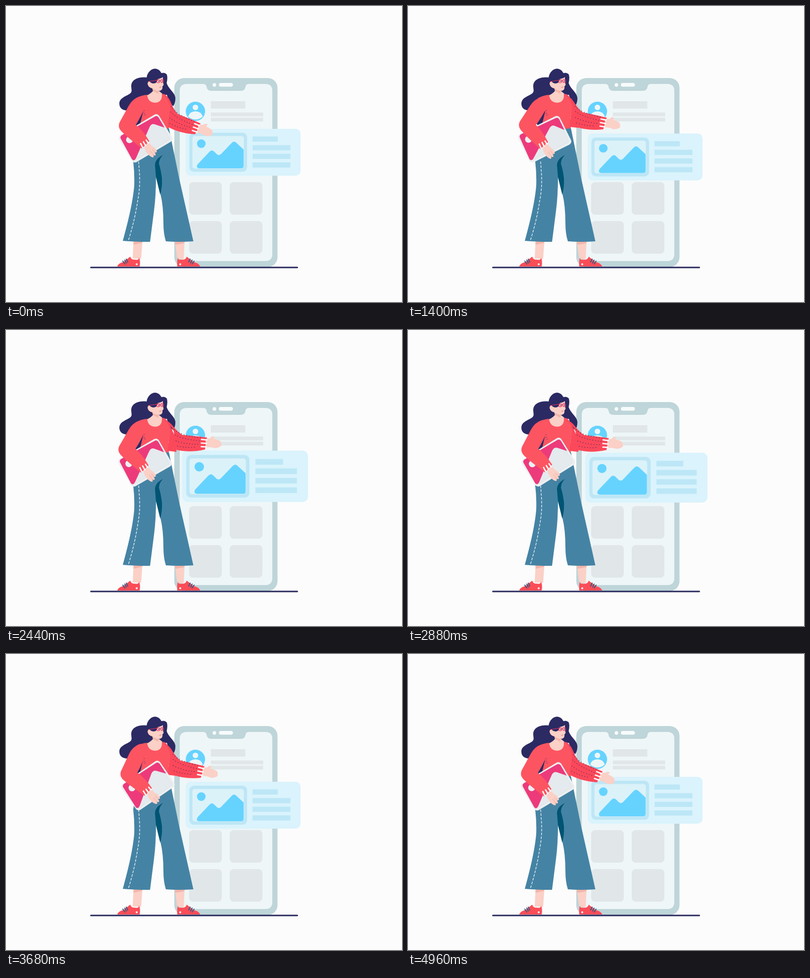
Recreate the animation shown at these times as an HTML page. Size 800x600 px, loop 5000 ms.

```html
<!DOCTYPE html>
<html lang="en">
<head>
<meta charset="utf-8">
<title>Presenting an app</title>
<style>
  html, body { margin: 0; width: 100%; height: 100%; overflow: hidden; background: #fcfcfc; }
  svg { display: block; width: 100%; height: 100%; }
  .navy { fill: #2b2a63; }
  .skin { fill: #fbd0c6; }
  .blush { fill: #f2b5aa; }
  .coral { fill: #fd5461; }
  .sleeve { fill: #fb485a; }
  .jeans { fill: #4583a4; }
  .sky { fill: #66d3ff; }
  .grey { fill: #e1e7e9; }
  .line { fill: none; stroke-linecap: round; stroke-linejoin: round; }
  .dots { stroke: #2b2a63; stroke-width: 1.5; stroke-dasharray: 0 5.6; }
  .cuff { stroke: #fff; stroke-width: 2.6; stroke-linecap: butt; }
</style>
</head>
<body>
<svg viewBox="0 0 800 600">
  <g id="phone">
    <rect x="340" y="146" width="208.5" height="383" rx="20" fill="#bed5d9"/>
    <path fill="#eef6f8" d="M365 158H398Q404 158 405 163Q406 172 415 172H474Q483 172 484 163Q485 158 491 158H524Q538 158 538 172V503Q538 517 524 517H365Q351 517 351 503V172Q351 158 365 158Z"/>
    <g fill="#f7fbfb">
      <circle cx="421" cy="160" r="3.7"/>
      <rect x="430" y="156" width="28.5" height="7.6" rx="3.8"/>
    </g>
    <circle class="sky" cx="382.7" cy="213.5" r="19.5"/>
    <g fill="#eef6f8">
      <circle cx="382.7" cy="205.5" r="5.6"/>
      <path d="M368 224Q371 213.5 382.7 213.5T397.5 224Q391 230 382.7 230T368 224Z"/>
    </g>
    <g class="grey">
      <path d="M414 193H483.5V208H414ZM414 216H519.5V223.5H414ZM414 226.5H519.5V234H414Z"/>
      <rect x="370" y="357" width="66" height="66" rx="8"/>
      <rect x="452" y="357" width="66" height="66" rx="8"/>
      <rect x="370" y="436" width="66" height="66" rx="8"/>
      <rect x="452" y="436" width="66" height="66" rx="8"/>
    </g>
  </g>

  <g id="card">
    <rect x="363" y="249" width="232" height="95" rx="10" fill="#daf3fc"/>
    <rect x="370.5" y="257" width="116.5" height="79" rx="9" fill="#bde6f5"/>
    <rect x="376.5" y="263.5" width="104" height="66" rx="5" fill="#dbf2f9"/>
    <circle class="sky" cx="394.5" cy="279" r="8.7"/>
    <path class="sky" d="M387 321L411 295.5Q416 290 421 295.5L426 300.5Q430 304 434 300.5L456 277.5Q460.5 273 465 277L480 291V324Q480 329 475 329H390Q383 328 387 321Z"/>
    <path fill="#bde7f6" d="M498 264.5H549V275H498ZM498 282H574.5V292.5H498ZM498 299.5H574.5V310H498ZM498 317H574.5V327.5H498Z"/>
  </g>

  <g id="woman">
    <path class="navy" d="M302 127C293 127 286 134 284 145C268 143 253 149 253 162C253 170 256 173 250 178C240 184 229 187 229 198C229 207 236 212 246 212L262 242L280 240L290 185L325 180Q329 198 338 203Q343 194 342 185C340 174 328 168 324.500 156Q327 147 325 139Q321 134 314 136Q310 128 302 127Z"/>
    <path class="skin" d="M295 163L297 172Q292 178 285 181V200H316V178L310 173Z"/>
    <path class="blush" d="M295 166L297 172L308 178V172Z"/>
    <path class="skin" d="M292 152Q300 149 306 148Q313 147 317 144Q316.500 153 318.500 160L316 163Q317 171 310 172Q301 172 296 167Q288 166 286 158Q286 152 292 152Z"/>
    <path class="navy" d="M289 152Q297 147 307 148Q305 157 298 157Q293 157 289 152Z"/>
    <g class="line" stroke="#e8315f" stroke-width="1.2">
      <path d="M288 153L304 150.5M311 151.500H313"/>
      <circle cx="307.500" cy="152.500" r="3.200"/>
      <ellipse cx="315.500" cy="152" rx="2.700" ry="3.300"/>
    </g>
    <path class="line" d="M310 165L313.5 164" stroke="#d86a70"/>
    <g class="navy">
      <circle cx="308.5" cy="152.5" r="1"/>
      <circle cx="316" cy="152" r="1"/>
    </g>

    <path class="skin" d="M258 470H276L273 512H256ZM340 470H361L359 513H346Z"/>
    <path class="blush" d="M258 477H276L275 480L257.5 484ZM341 477H361L360 481L342 484Z"/>
    <path fill="#fb4d57" d="M225 527Q228 521 237 519L251 508Q253 515 260 514Q268 516 269 510Q272 518 270 528H225ZM392 527Q389 521 379 519L365 508Q363 515 356 514Q348 516 347 510Q345 518 346 528H392Z"/>
    <path class="line" d="M236 517L240 523M240 515L243 521M243 513L246 519M380 517L376 523M376 515L373 521M372 513L369 519" stroke="#365a83" stroke-width="2"/>
    <g fill="#fff">
      <circle cx="264" cy="523.5" r="2"/>
      <circle cx="352" cy="523.5" r="2"/>
    </g>

    <path class="jeans" d="M268 247H329L350 350L378.5 477Q350 479 323 477Q318 462 318 440Q318 405 312 381L303 345Q303 385 299 415L291 478Q262 478 236 476C245 443 256 400 259 365Q260 340 257 315Z"/>
    <path fill="#005474" d="M317 302Q301 310 301 323L303 347L311.5 382Q316 368 315 349Q313 332 309 320Q309 310 317 302Z"/>
    <path class="line" d="M268 316C269 335 273 360 266 395Q260 435 247 476" stroke="#e6f1f5" stroke-width="1.4" stroke-dasharray="4 3.8"/>

    <path class="coral" d="M285 180Q287 196 302 196Q316 195 315 178L321 179Q335 192 333 206Q326 226 329 248L268 252L277 214L262 187Q273 181 285 180Z"/>
    <path class="line dots" d="M279 212V218M281 221H285"/>

    <path class="sleeve" d="M320 180L332 194L339 211L347 220L344 247L327 245Q328 222 332 207Q330 190 320 180Z"/>
    <g id="rightArm">
      <path class="sleeve" d="M318 179Q326 181 332 193Q339 211 347 219L377 231L393 238L382 260Q350 258 327 245Q328 222 332 207Q330 190 318 179Z"/>
      <path class="line dots" d="M334 204Q342 219 384 236M333 215Q344 227 380 242M331 227Q348 240 376 247M331 238Q350 248 366 250"/>
      <path class="skin" d="M389 240L398 241Q404 237 407 240Q408 242 404 244Q413 248 417 253Q418 257 416 262Q409 265 402 263Q393 257 385 257Z"/>
      <path class="line cuff" d="M380 238L392 243M377.5 245L389.5 249.5M375.5 252L387 256"/>
    </g>

    <g id="leftArm">
      <g transform="rotate(-30.5 281.5 268.5)">
        <rect x="234.500" y="236.500" width="94" height="64" rx="7" fill="#ebeff1"/>
        <rect x="239.500" y="241.500" width="84" height="54" rx="4" fill="#e4eaed" stroke="#d9e0e3" stroke-width=".7"/>
      </g>
      <path fill="#ed3a7a" d="M233 262L301 224Q305 222 308 226L320 247L300 240Q294 238 290 245L263 306Q259 316 254 311L231 268Q230 264 233 262Z"/>
      <circle cx="249" cy="271" r="7" fill="#eaf0f3"/>
      <path class="skin" d="M279 286L287 276L294 284Q303 289 304 295Q304 298 300 297L302 302Q300 305 297 302Q299 308 295 307Q289 305 286 300Q280 294 279 286Z"/>
      <path class="line" d="M291 294L297 302M295 291L300 297" stroke="#eeb3a8"/>
      <path class="coral" d="M273 183Q257 186 248 202L229 236Q225 246 233 254Q247 268 274 289L289 274Q276 252 262 241Q272 225 278 211Z"/>
      <path class="line cuff" d="M271 278L276 288M276.5 274.5L282 284M282 271L287.5 279"/>
    </g>
  </g>
  <path class="line" d="M171.5 530H588.5" stroke="#292b5e" stroke-width="3"/>
</svg>

<script>
const LOOP = 5000;
const bob = [[0, 0], [1200, 10], [2450, 0], [3680, 10], [LOOP, 0]];
const pulse = [[0, 1], [1500, 1], [1950, .905], [2520, 1.105], [3350, 1], [LOOP, 1]];
const [card, rightArm, leftArm] = ['card', 'rightArm', 'leftArm'].map(id => document.getElementById(id));

// Cosine-eased value between the keys around t.
function at(keys, t) {
  const i = keys.findIndex(key => key[0] > t);
  const [t0, v0] = keys[i - 1], [t1, v1] = keys[i];
  return v0 + (v1 - v0) * (1 - Math.cos(Math.PI * (t - t0) / (t1 - t0))) / 2;
}

const wave = (t, start) => Math.cos(2 * Math.PI * (t - start) / LOOP);
const move = (part, value) => part.setAttribute('transform', value);

function draw() {
  const t = performance.now() % LOOP;
  move(card, `translate(437 ${296.5 + at(bob, t)}) scale(${at(pulse, t)}) translate(-437 -296.5)`);
  move(rightArm, `rotate(${-8.2 * (1 - wave(t, 0))} 330 182)`);
  move(leftArm, `rotate(${4.1 * wave(t, 1320)} 257 192)`);
  requestAnimationFrame(draw);
}
draw();
</script>
</body>
</html>
```
